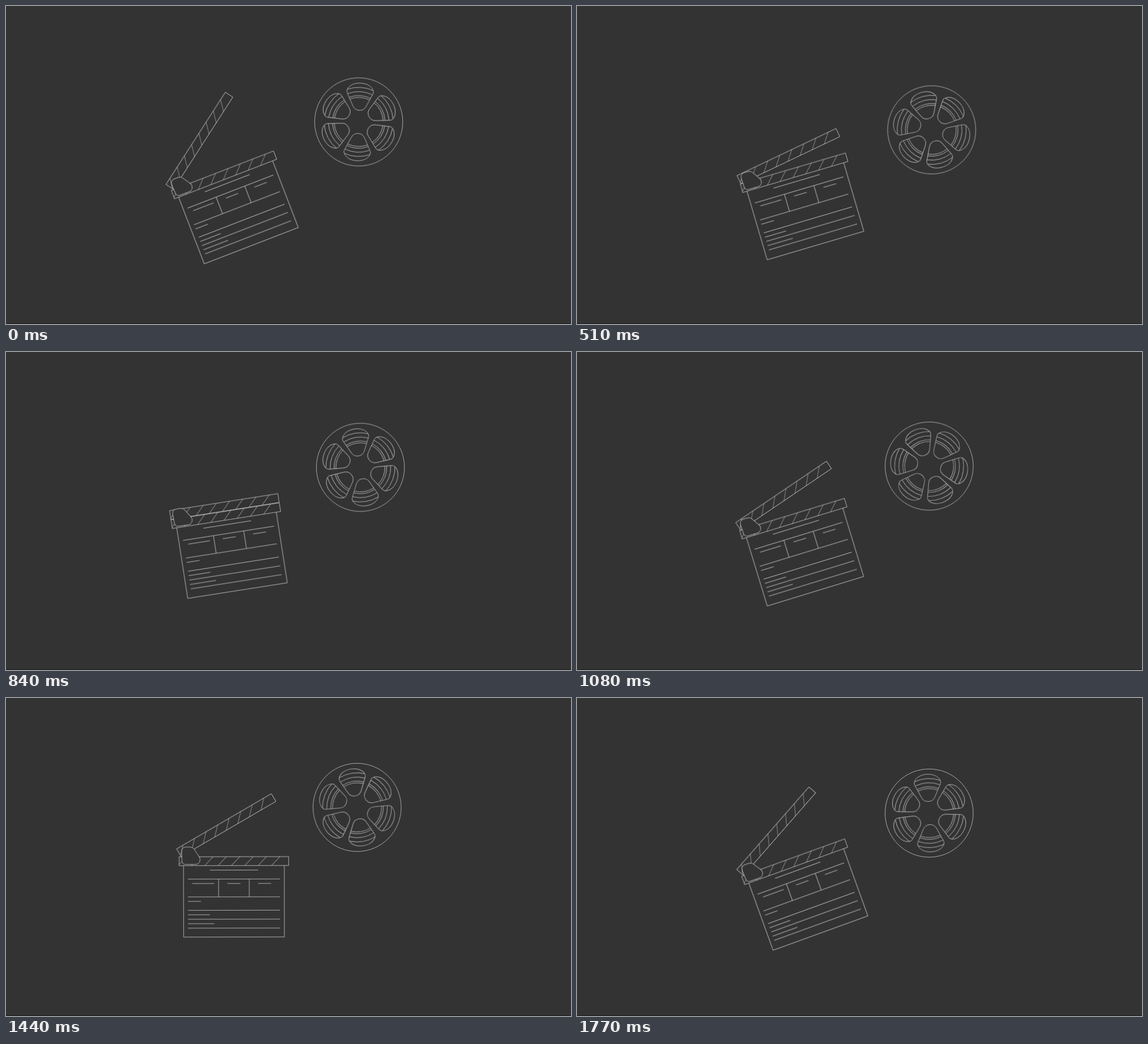
Write an HTML page that moves like this. It is 998 px wide and 561 px high and loops after 1.8 s.

```html
<!DOCTYPE html>
<html lang="en">
<head>
<meta charset="utf-8">
<title>Clapperboard and film reel</title>
<style>
  html, body { margin: 0; width: 100%; height: 100%; overflow: hidden; background: #333; }
  svg { display: block; width: 998px; height: 561px; }
  .ink { fill: none; stroke: #d2d2d2; stroke-width: 0.76; }
  .ink path { vector-effect: non-scaling-stroke; }
  .solid { fill: #333; }

  #board, #arm, #reel { animation: 1800ms ease-in-out infinite; }
  #board { animation-name: rock; }
  #arm { animation-name: clap; transform-origin: 2px -7.2px; }
  #reel { animation-name: drift; }
  #spokes { animation: spin 1800ms linear infinite; }

  @keyframes rock {
    0% { transform: translate(407.8px, 356.9px) rotate(-21.1deg); }
    16.667% { transform: translate(397.9px, 358.5px) rotate(-4.9deg); }
    28.333% { transform: translate(401.3px, 354.8px) rotate(-16.4deg); }
    46.667% { transform: translate(398px, 351.1px) rotate(-8.9deg); }
    60% { transform: translate(400.5px, 354.5px) rotate(-17deg); }
    71.667% { transform: translate(401.8px, 345.9px) rotate(-2deg); }
    88.333% { transform: translate(403.4px, 356px) rotate(1.75deg); }
    98.333%, 100% { transform: translate(406px, 348.3px) rotate(-19.9deg); }
  }
  @keyframes clap {
    0% { transform: rotate(-36.1deg); }
    16.667% { transform: rotate(-6.2deg); }
    28.333% { transform: rotate(-9deg); }
    46.667% { transform: rotate(0deg); }
    71.667% { transform: rotate(-30.4deg); }
    98.333%, 100% { transform: rotate(-28.9deg); }
  }
  @keyframes drift {
    0% { transform: translate(623px, 204.5px); }
    16.667% { transform: translate(624px, 200px); }
    28.333% { transform: translate(626.5px, 218.5px); }
    46.667% { transform: translate(626px, 203.5px); }
    71.667% { transform: translate(618.9px, 199.5px); }
    78% { transform: translate(620px, 191.5px); }
    88.333% { transform: translate(622px, 209.7px); }
    98.333%, 100% { transform: translate(622px, 203px); }
  }
  @keyframes spin {
    from { transform: rotate(2.6deg); }
    to { transform: rotate(362.6deg); }
  }
</style>
</head>
<body>
<svg viewBox="0 0 998 561">
  <defs>
    <path id="lobe" d="M0-68.5C11-68.5 20-64 23-56C24-53 23-51.2 22-49L11.9-28.2A13 13 0 0 1-11.9-28.2L-22-49C-23-51.2-24-53-23-56C-20-64-11-68.5 0-68.5Z"/>
    <clipPath id="window"><use href="#lobe"/></clipPath>
    <g id="spoke">
      <use href="#lobe"/>
      <g clip-path="url(#window)">
        <circle r="61"/><circle r="53.5"/><circle r="46.5"/><circle r="43.3"/>
      </g>
    </g>
    <g id="stick">
      <rect width="193.5" height="15.7"/>
      <path id="stripes"/>
    </g>
  </defs>
  <rect y="560" width="998" height="1" fill="#1c1c1c"/>

  <g id="board" class="ink">
    <g transform="translate(-96.7 -71)">
      <!-- slate and its rules, in grid cells -->
      <g transform="scale(7.74 7.87)">
        <path d="M1 2V18H24V2M9 5V9M16 5V9"/>
        <path d="M2 5H23M2 9H23M2 12H23M2 14H23M2 16H23"/>
        <path d="M7 3H18M3 6H8M11 6H14M18 6H21M2 10H5M2 13H7M2 15H8"/>
      </g>
      <use href="#stick"/>
      <g id="arm"><use href="#stick" y="-16.2"/></g>
      <path class="solid" d="M4.4-9Q5-17.2 12-17.2H19Q24-17.2 26.3-13.8L36 1Q38.2 5 36 9.2Q33.6 13.4 29 13.4H11.5Q5.4 13.4 5 7.5Z"/>
    </g>
  </g>

  <g id="reel" class="ink">
    <circle r="77.8"/>
    <g id="spokes"></g>
  </g>
</svg>
<script>
const get = id => document.getElementById(id);

// The first stripe is cut off by the end of the stick
let stripes = "M12.8 0L0 13.4";
for (let k = 1; k < 8; k++) stripes += `M${12.8 + 23.6 * k} 0l-15 15.7`;
get("stripes").setAttribute("d", stripes);

let spokes = "";
for (let a = 0; a < 360; a += 60) spokes += `<use href="#spoke" transform="rotate(${a})"/>`;
get("spokes").innerHTML = spokes;
</script>
</body>
</html>
```
